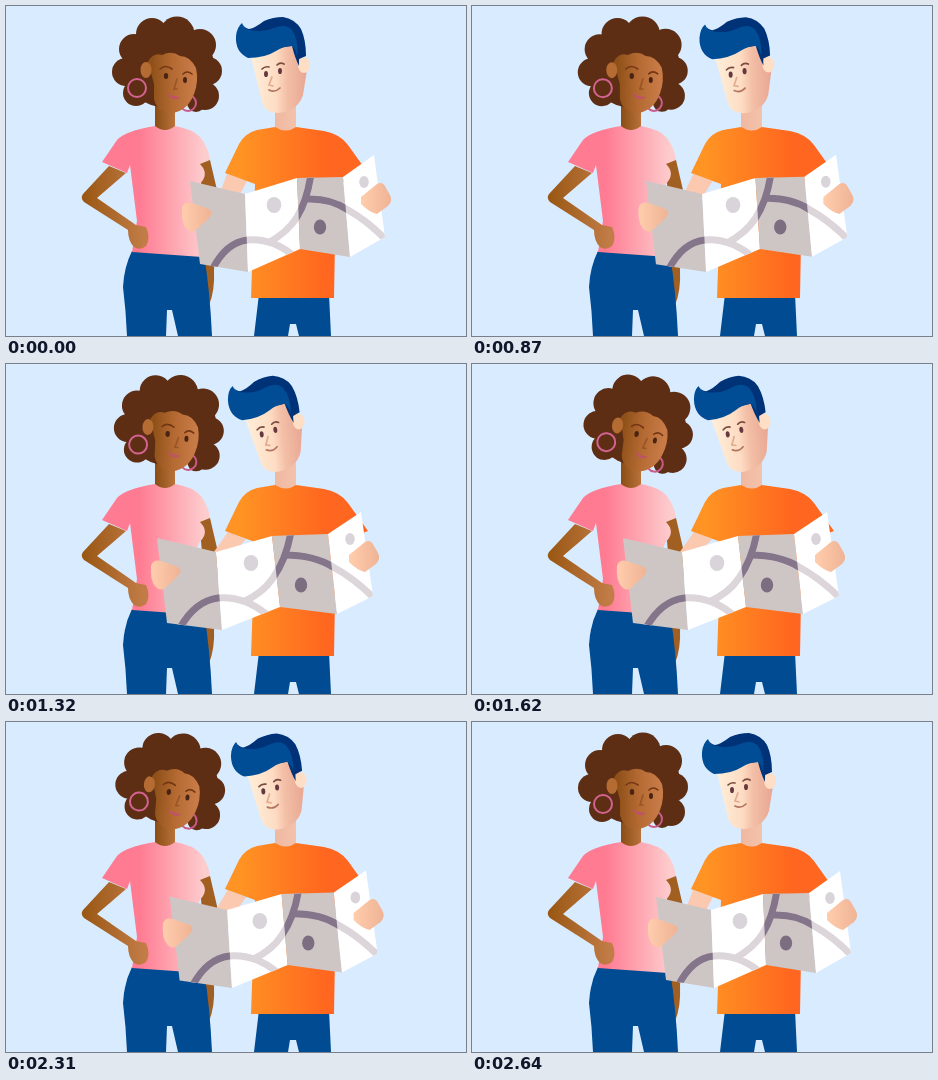
An HTML page for the animation above (2670 ms loop, 460x330 px).

```html
<!DOCTYPE html>
<html lang="en">
<head>
<meta charset="utf-8">
<title>Two people reading a map</title>
<style>
  html, body { margin: 0; width: 100%; height: 100%; overflow: hidden; background: #d9ebff; }
  svg { display: block; width: 100vw; height: 100vh; }
</style>
</head>
<body>
<svg viewBox="0 0 460 330">
  <defs>
    <linearGradient id="pink" gradientUnits="userSpaceOnUse" x1="126" x2="198">
      <stop offset="0.1" stop-color="#ff7b92"/><stop offset="1" stop-color="#fdcccd"/>
    </linearGradient>
    <linearGradient id="orange" gradientUnits="userSpaceOnUse" x1="235" x2="320">
      <stop offset="0" stop-color="#ff9323"/><stop offset="1" stop-color="#ff661f"/>
    </linearGradient>
    <linearGradient id="brown" gradientUnits="userSpaceOnUse" x1="146" x2="188">
      <stop offset="0" stop-color="#8f5119"/><stop offset="0.5" stop-color="#b56a33"/><stop offset="1" stop-color="#c87b47"/>
    </linearGradient>
    <linearGradient id="brownNeck">
      <stop offset="0" stop-color="#8a4d15"/><stop offset="1" stop-color="#b8723a"/>
    </linearGradient>
    <linearGradient id="arm" gradientUnits="userSpaceOnUse" x1="78" x2="138">
      <stop offset="0" stop-color="#9a5814"/><stop offset="1" stop-color="#c27c47"/>
    </linearGradient>
    <linearGradient id="face" gradientUnits="userSpaceOnUse" x1="246" x2="300">
      <stop offset="0" stop-color="#ffeed9"/><stop offset="0.45" stop-color="#fddcc3"/>
      <stop offset="0.65" stop-color="#f3bfa6"/><stop offset="1" stop-color="#e9a793"/>
    </linearGradient>
    <linearGradient id="neck">
      <stop offset="0" stop-color="#f0b8a0"/><stop offset="1" stop-color="#f3c2ab"/>
    </linearGradient>
    <linearGradient id="hand">
      <stop offset="0" stop-color="#ffcdad"/><stop offset="1" stop-color="#efb395"/>
    </linearGradient>
    <clipPath id="sheet"><path class="panel0"/><path class="panel1"/><path class="panel2"/><path class="panel3"/></clipPath>
    <clipPath id="shade"><path class="panel0"/><path class="panel2"/></clipPath>
    <g id="roads" fill="none" stroke="currentColor" stroke-width="7">
      <path id="ring"/><path id="bend"/><path id="branch"/>
    </g>
  </defs>

  <g id="womanBody">
    <path fill="#a15f22" d="M193 154L204 154L211 184Q213 200 211 225L208 264Q209 285 203 299L198 290L197 200Z"/>
    <path fill="#004b91" d="M126 245L198 249Q204 285 206 330H172L166 304H161L160 330H121Q120 305 117 281Q118 261 126 245Z"/>
    <path fill="url(#brownNeck)" d="M149 92H169V121Q159 129 149 121Z"/>
    <path fill="url(#pink)" d="M149 120Q159 128 169 120Q187 123 195 132Q202 141 204 154L194 158Q202 166 197 174Q190 182 191 190L196 251L126 246L131 215L124 159L121 167L96 156L111 134Q119 125 149 120Z"/>
    <path fill="url(#arm)" d="M103 160L77 188Q74 192 78 196L122 224Q122 235 128 241Q134 245 140 240Q145 232 140 221L130 219L91 192L120 167Z"/>
  </g>

  <g id="womanHead">
    <g id="curls" fill="#5d2e14"><ellipse cx="162" cy="60" rx="46" ry="42"/></g>
    <circle cx="182" cy="97" r="8" fill="none" stroke="#c95b8b" stroke-width="2"/>
    <path fill="url(#brown)" d="M142 56Q147 46 156 49Q166 44 174 50Q184 50 190 62Q193 75 188 88Q182 104 167 107Q151 107 148 93V78Z"/>
    <ellipse cx="140" cy="64" rx="5.5" ry="8" fill="#b56c32"/>
    <circle cx="131" cy="82" r="9" fill="none" stroke="#d36391" stroke-width="2"/>
    <g fill="none" stroke="#743613" stroke-width="1.6" stroke-linecap="round">
      <path d="M154 63Q159 58 166 63M177 68Q181 64 186 68"/>
      <path stroke="#985425" d="M171 73L168 83H171"/>
    </g>
    <g fill="#4a2412"><ellipse cx="160" cy="70" rx="2.2" ry="3"/><ellipse cx="179" cy="74" rx="2" ry="3"/></g>
    <path fill="#bd5268" d="M160 87Q167 91 174 91Q167 97 160 87Z"/>
  </g>

  <g id="manBody">
    <path fill="#fbc8b0" id="forearm"/>
    <path fill="#004b91" d="M253 288H323L325 330H293L290 318H284L282 330H248Z"/>
    <path fill="url(#neck)" d="M269 96H290V122Q280 128 269 122Z"/>
    <path fill="url(#orange)" d="M269 121Q280 128 290 121L318 125Q334 128 342 139L362 167L330 179L328 292H245L249 178L219 167L233 138Q239 127 251 124Z"/>
  </g>

  <g id="manHead">
    <path fill="url(#face)" d="M243 42L290 36L301 64L297 89Q292 105 272 107Q259 107 256 96Z"/>
    <ellipse cx="298" cy="59" rx="6" ry="8" fill="#fedfc6"/>
    <path fill="#003278" d="M236 17Q238 22 243 23Q249 22 258 15Q267 11 277 11Q289 13 295 23Q300 34 300 50L293 53V60Q289 52 286 40L250 45Z"/>
    <path fill="#004d95" d="M236 17Q238 23 244 24Q257 27 268 22Q280 17 286 24Q293 34 291 51Q290 43 286 40Q278 40 270 45Q259 52 242 52Q229 46 230 30Q231 21 236 17Z"/>
    <g fill="none" stroke="#7b4b42" stroke-width="1.7" stroke-linecap="round">
      <path d="M256 63Q259 60 263 61M271 59Q274 56 278 58"/>
      <path stroke="#e2ac90" d="M266 71L263 79L267 80"/>
      <path stroke="#b4755f" d="M263 84Q269 87 274 82"/>
    </g>
    <g fill="#643a40"><ellipse cx="260" cy="68" rx="2" ry="3.1"/><ellipse cx="274" cy="65" rx="2" ry="3.1"/></g>
  </g>

  <g id="map">
    <path class="panel0" fill="#cec6c5"/><path class="panel1" fill="#fff"/>
    <path class="panel2" fill="#cec6c5"/><path class="panel3" fill="#fff"/>
    <g clip-path="url(#sheet)"><use href="#roads" color="#dcd5da"/></g>
    <g clip-path="url(#shade)"><use href="#roads" color="#85758a"/></g>
    <ellipse id="dot0" rx="7.3" ry="8" fill="#d9d4da"/>
    <ellipse id="dot1" rx="6.2" ry="7.6" fill="#7c6e80"/>
    <ellipse id="dot2" rx="4.8" ry="6" fill="#d9d4da"/>
  </g>
  <path id="leftHand" fill="url(#hand)" d="M176 202Q178 195 186 197L203 203Q208 206 203 212L190 224Q185 228 180 222Q175 216 176 202Z"/>
  <path id="rightHand" fill="url(#hand)" d="M355 191L371 178Q377 175 380 182L384 189Q387 195 382 200L371 208Q363 206 355 198Z"/>
</svg>
<script>
const LOOP = 2670;
const byId = id => document.getElementById(id);

// Each pair holds the first and the second pose.
const TOP = [[[184, 175], [239, 188], [291, 172], [337, 171], [368, 149]],
             [[151, 174], [210, 188], [266, 172], [322, 170], [355, 148]]];
const BOTTOM = [[[194, 258], [242, 266], [294, 243], [344, 251], [379, 231]],
                [[161, 259], [216, 266], [274, 243], [331, 250], [367, 232]]];
const DOTS = [[[268, 199], [314, 221], [358, 176]],
              [[245, 199], [295, 221], [344, 175]]];
const PATHS = {
  ring: ['M206 264Q220 236 242 234Q266 232 288 250', 'M174 264Q189 237 212 234Q238 232 260 250'],
  bend: ['M305 168Q301 195 291 211Q282 226 262 237', 'M285 168Q280 196 267 214Q257 229 237 238'],
  branch: ['M300 193Q325 192 342 204Q362 215 382 236', 'M278 191Q308 191 327 203Q348 214 370 236'],
  forearm: ['M221 168L241 175L232 192L212 192Z', 'M222 168L240 175L225 192L205 192Z']
};

const CURLS = [[120, 66, 14], [128, 43, 15], [146, 28, 16], [171, 28, 17.5], [194, 39, 16],
               [202, 65, 14], [199, 90, 14], [190, 97, 9], [130, 87, 13]];
byId('curls').innerHTML += CURLS.map(([x, y, r]) => `<circle cx="${x}" cy="${y}" r="${r}"/>`).join('');

const mix = (a, b, k) => a + (b - a) * k;
const mixPoints = ([a, b], k) => a.map(([x, y], i) => [mix(x, b[i][0], k), mix(y, b[i][1], k)]);
const mixPath = ([a, b], k) => {
  const ends = b.match(/[\d.]+/g);
  let i = 0;
  return a.replace(/[\d.]+/g, n => mix(+n, +ends[i++], k).toFixed(2));
};
const ease = (t, from, to, power = 1) => {
  const u = Math.min(1, Math.max(0, (t - from) / (to - from))) ** power;
  return u * u * (3 - 2 * u);
};
const turn = (id, angle, x, y) => byId(id).setAttribute('transform', `rotate(${angle} ${x} ${y})`);
const shift = (id, x, y) => byId(id).setAttribute('transform', `translate(${x} ${y})`);

function drawMap(k) {
  const top = mixPoints(TOP, k), bottom = mixPoints(BOTTOM, k);
  for (let i = 0; i < 4; i++) {
    const d = `M${[top[i], top[i + 1], bottom[i + 1], bottom[i]].join('L')}Z`;
    document.querySelectorAll('.panel' + i).forEach(p => p.setAttribute('d', d));
  }
  mixPoints(DOTS, k).forEach(([x, y], i) => shift('dot' + i, x, y));
  for (const id in PATHS) byId(id).setAttribute('d', mixPath(PATHS[id], k));
}

function render(t) {
  const back = ease(t, 2100, 2640, 0.92);
  const pose = ease(t, 690, 1230, 0.92) - back;
  // The woman leans back a little before she tilts her head.
  const tilt = -0.8 * ease(t, 690, 1080) + 8.3 * ease(t, 1080, 1620) - 7.5 * back;
  drawMap(pose);
  turn('manHead', -6 * pose, 280, 110);
  turn('womanHead', tilt, 162, 105);
  shift('leftHand', -31 * pose, 0);
  shift('rightHand', -12 * pose, 0);
}

const start = performance.now();
function tick() {
  render((performance.now() - start) % LOOP);
  requestAnimationFrame(tick);
}
tick();
</script>
</body>
</html>
```
